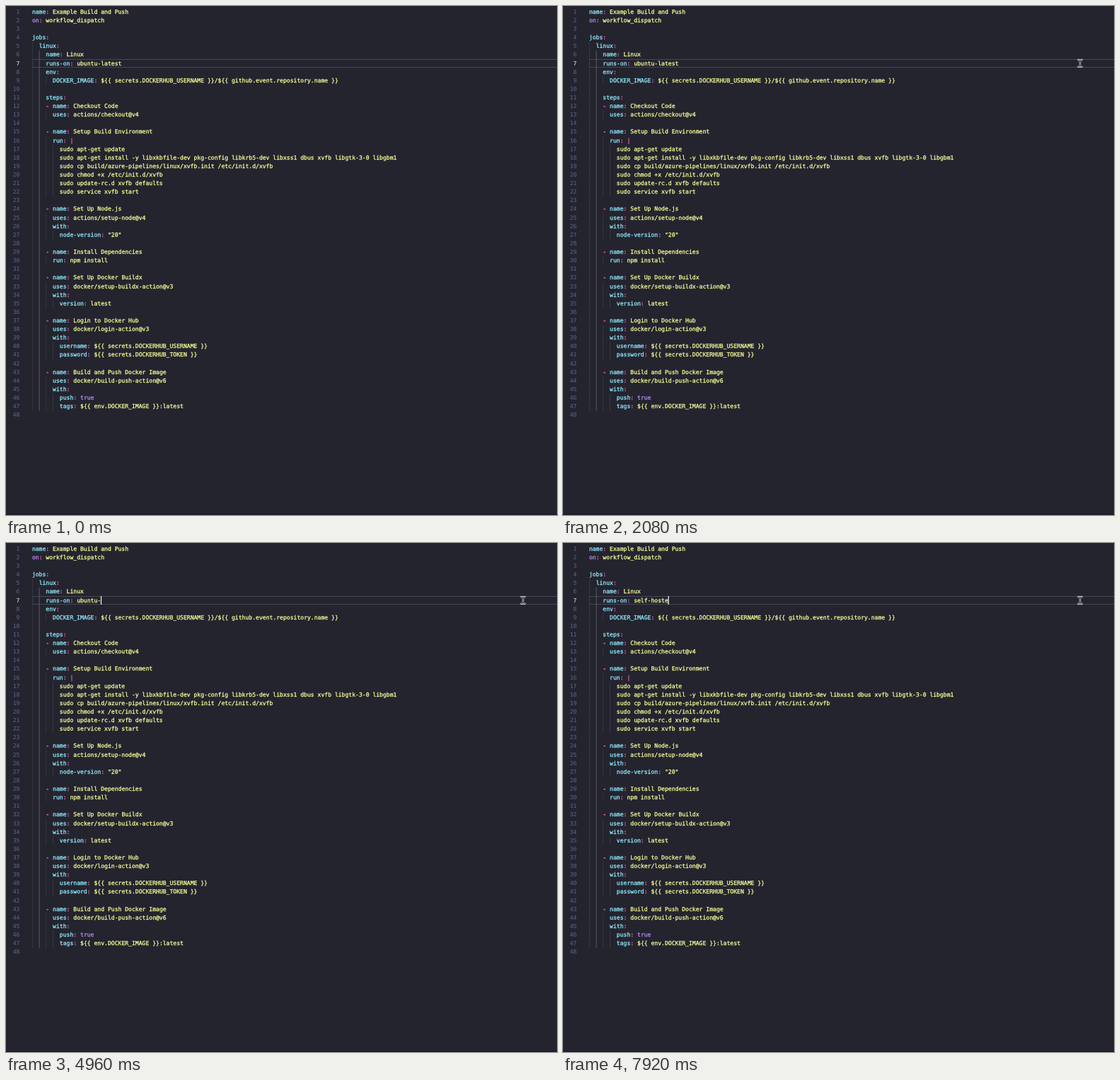
Recreate the animation shown at these times as an HTML page. Size 779 by 719 pixels, loop 8 s.

```html
<!DOCTYPE html>
<html lang="en">
<head>
<meta charset="utf-8">
<style>
html, body { margin: 0; width: 100%; height: 100%; overflow: hidden; background: #24242f; }
svg { display: block; width: 779px; height: 719px; }
text {
  font: 8.08px "DejaVu Sans Mono", monospace;
  white-space: pre; text-rendering: geometricPrecision;
  font-variant-ligatures: none; stroke-width: .28px;
}
.key { fill: #90ecfe; stroke: #90ecfe; }
.str { fill: #f7ff96; stroke: #f7ff96; }
.op { fill: #f55fae; stroke: #f55fae; }
.dash { fill: #f5509f; stroke: #f5509f; stroke-width: .6px; }
.const { fill: #b58df0; stroke: #b58df0; }
.num { fill: #5c6692; text-anchor: end; }
.num.on { fill: #f0f0ec; }
</style>
</head>
<body>
<svg id="stage" viewBox="0 0 779 719"></svg>
<script>
const LEFT = 36.9, TOP = 2.2, CHAR = 4.865, LINE = 12.117, BASE = 8.6;
const ACTIVE = 7, VALUE_COL = 13, OLD = 'ubuntu-latest', NEW = 'self-hosted';

const code = `name: Example Build and Push
on: workflow_dispatch

jobs:
  linux:
    name: Linux
    runs-on: ubuntu-latest
    env:
      DOCKER_IMAGE: \${{ secrets.DOCKERHUB_USERNAME }}/\${{ github.event.repository.name }}

    steps:
    - name: Checkout Code
      uses: actions/checkout@v4

    - name: Setup Build Environment
      run: |
        sudo apt-get update
        sudo apt-get install -y libxkbfile-dev pkg-config libkrb5-dev libxss1 dbus xvfb libgtk-3-0 libgbm1
        sudo cp build/azure-pipelines/linux/xvfb.init /etc/init.d/xvfb
        sudo chmod +x /etc/init.d/xvfb
        sudo update-rc.d xvfb defaults
        sudo service xvfb start

    - name: Set Up Node.js
      uses: actions/setup-node@v4
      with:
        node-version: "20"

    - name: Install Dependencies
      run: npm install

    - name: Set Up Docker Buildx
      uses: docker/setup-buildx-action@v3
      with:
        version: latest

    - name: Login to Docker Hub
      uses: docker/login-action@v3
      with:
        username: \${{ secrets.DOCKERHUB_USERNAME }}
        password: \${{ secrets.DOCKERHUB_TOKEN }}

    - name: Build and Push Docker Image
      uses: docker/build-push-action@v6
      with:
        push: true
        tags: \${{ env.DOCKER_IMAGE }}:latest
`.split('\n');

const stage = document.getElementById('stage');
function add(parent, tag, attrs, content = '') {
  const el = document.createElementNS('http://www.w3.org/2000/svg', tag);
  for (const k in attrs) el.setAttribute(k, attrs[k]);
  el.textContent = content;
  return parent.appendChild(el);
}
const rect = (x, y, width, height, fill) => add(stage, 'rect', { x, y, width, height, fill });
const colX = col => LEFT + col * CHAR;
const lineY = n => TOP + (n - 1) * LINE;
const indent = s => s.search(/\S/);

// Blank lines take the indentation of the next line that has text
function depth(i) {
  const next = code.slice(i).find(s => s);
  return next ? indent(next) / 2 : 0;
}

function tokens(line) {
  const m = line.match(/^( *)(- )?([\w-]+)(:)( .*)?$/);
  if (!m) return [['str', line.trim()]];
  const value = m[5] || '', v = value.trim();
  return [
    ['dash', m[2] || ''],
    [m[3] === 'on' ? 'const' : 'key', m[3]],
    ['op', ':'],
    [v === '|' ? 'op' : v === 'true' ? 'const' : 'str', value]
  ];
}

rect(0, 717, 779, 2, '#1e1d28');
add(stage, 'rect', { x: 37.5, y: 75.5, width: 760, height: 11, fill: 'none', stroke: '#454757' });
const highlight = rect(colX(VALUE_COL), lineY(ACTIVE) + .3, OLD.length * CHAR, 11.5, '#48757f');

let typed;
code.forEach((line, i) => {
  const n = i + 1, y = lineY(n) + BASE;
  for (let g = 0; g < depth(i); g++)
    rect(colX(g * 2), lineY(n), .8, LINE, g === 1 ? '#686874' : '#3c3c49');
  add(stage, 'text', { x: 19.4, y, class: n === ACTIVE ? 'num on' : 'num' }, n);
  if (!line) return;
  const text = add(stage, 'text', { x: colX(indent(line)), y });
  for (const [cls, s] of tokens(line)) {
    const span = add(text, 'tspan', { class: cls }, s);
    if (n === ACTIVE) typed = span;
  }
});

const caret = rect(0, lineY(ACTIVE), 1.2, LINE, '#f8f8f2');
const arrow = add(stage, 'path', {
  d: 'M0 0V9.2L2.2 7.2L3.7 10.6L5.2 9.9L3.8 6.7H6.6Z',
  fill: '#15151b', stroke: '#f4f4f4', 'stroke-width': .9, 'stroke-linejoin': 'round'
});
const beam = add(stage, 'g', { transform: 'translate(731 81)' });
for (const [stroke, w] of [['#f0f0f0', 2.3], ['#1b1b22', 1]])
  add(beam, 'path', {
    d: 'M-2.6 -5Q0 -5 0 -2.5Q0 -5 2.6 -5M0 -2.5V2.5M-2.6 5Q0 5 0 2.5Q0 5 2.6 5',
    fill: 'none', stroke, 'stroke-width': w, 'stroke-linecap': 'round'
  });

const ENTER = 1360, BEAM = 1840, CLICK = 2140, ERASE = 3840, TYPE = 6280;
const show = (el, on) => el.setAttribute('visibility', on ? 'visible' : 'hidden');
const count = (t, start, step) => t < start ? 0 : Math.floor((t - start) / step) + 1;

function draw(t) {
  const value = t < TYPE
    ? OLD.slice(0, Math.max(0, OLD.length - count(t, ERASE, 195)))
    : NEW.slice(0, count(t, TYPE, 178));
  typed.textContent = ' ' + value;

  caret.setAttribute('x', colX(VALUE_COL + value.length) - .3);
  show(caret, t >= ERASE || t >= CLICK && (t - CLICK) % 1000 < 500);
  show(highlight, t >= CLICK + 250 && t < ERASE);

  const p = Math.min(1, Math.max(0, (t - ENTER) / 240));
  const away = (1 - p) ** 2;
  arrow.setAttribute('transform', `translate(${731 + 22.5 * away} ${75 - 4.5 * away})`);
  show(arrow, t >= ENTER && t < BEAM);
  show(beam, t >= BEAM);
}

const begin = performance.now();
function frame() {
  draw((performance.now() - begin) % 8000);
  requestAnimationFrame(frame);
}
draw(0);
requestAnimationFrame(frame);
</script>
</body>
</html>
```
